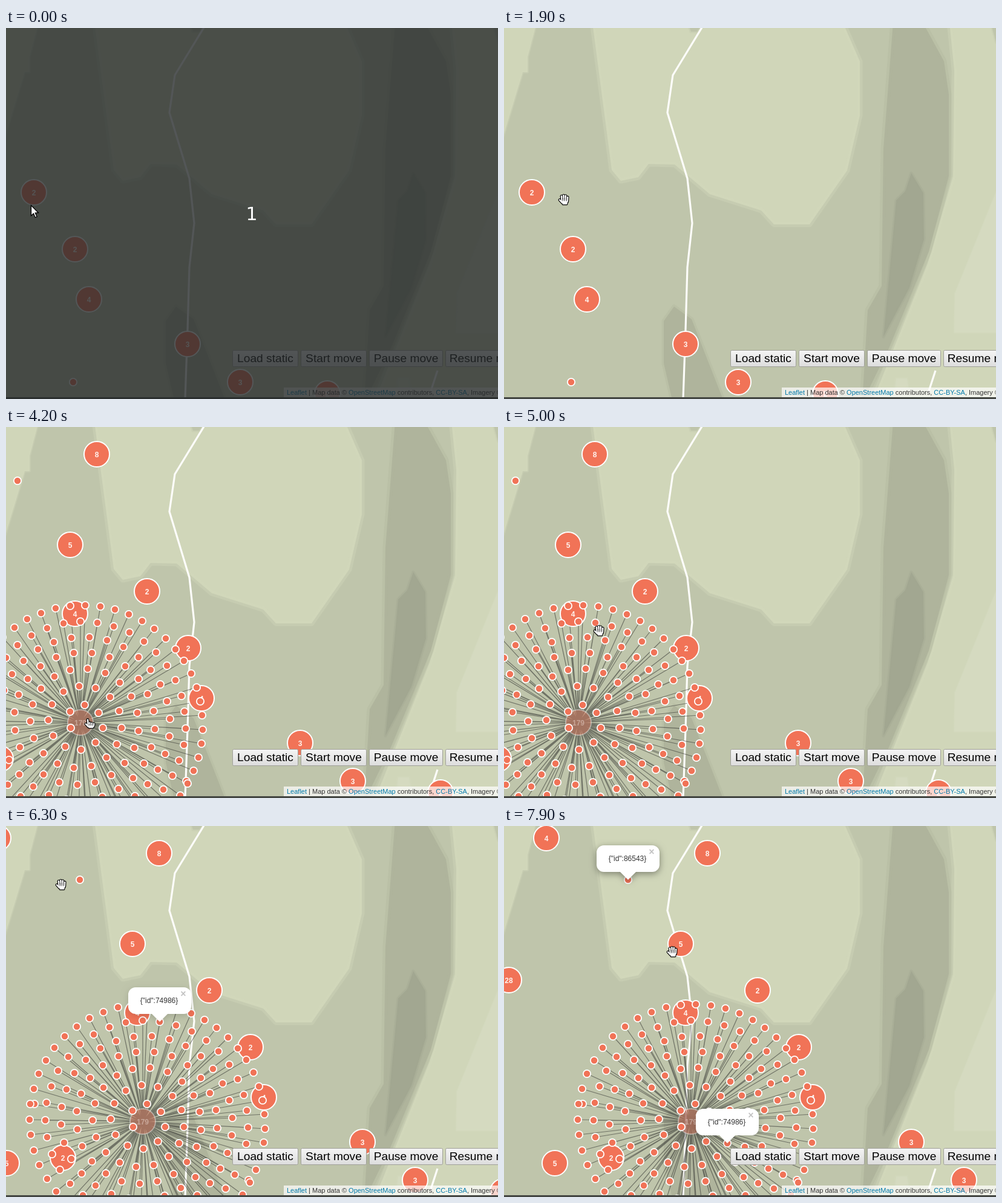
An HTML page with a canvas for the animation above (8000 ms loop, 813 by 614 pixels).

```html
<!DOCTYPE html>
<html lang="en">
<head>
<meta charset="utf-8">
<title>Clustered map</title>
<style>
html, body { margin: 0; width: 100%; height: 100%; overflow: hidden; background: #bfc5ab; }
canvas { display: block; width: 813px; height: 614px; }
</style>
</head>
<body>
<canvas id="stage" width="813" height="614"></canvas>
<script>
const W = 813, H = 614, LOOP = 8000, STEP = 100, SPIDER_AT = 4200;
const ctx = document.getElementById('stage').getContext('2d');
const SANS = '"Liberation Sans", Arial, sans-serif';
const RED = '#f17357', BASE = '#bfc5ab', LIGHT = '#d0d6b9', VALLEY = '#afb49c', PALE = '#d5dac0';

// [x, y, count] before any panning; no count means a single marker
const PINS = [
  [-303, 20, 4], [-37, 45, 8], [-168, 89], [-81, 195, 5], [-365, 255, 28],
  [46, 272, 2], [-73, 309, 4], [114, 366, 2], [136.6, 449, 4], [299.6, 523, 3],
  [-243, 460], [-196, 549, 2], [-289, 558, 5], [386.6, 586, 3], [111, 586], [531, 605, 2]
];
const HUB = [-64, 489];

// Straight cursor moves: [start, end, x, y]
const MOVES = [
  [200, 300, 58, 302], [300, 500, 52, 282], [600, 900, 76, 283], [1500, 1900, 99, 284],
  [2000, 2300, 64, 283], [2400, 2900, 116, 284], [2900, 3300, 117, 316], [3300, 3800, 132, 494],
  [4100, 4200, 139, 491], [4200, 4600, 171, 353], [4700, 5100, 152, 332], [5400, 5600, 160, 317],
  [5600, 6100, 56, 97], [6100, 6700, 160, 98], [6800, 7000, 206, 97], [7700, 7900, 278, 208]
];

// Spiral of markers, each step keeping a near-constant gap along the curve
function spiral(count) {
  const feet = [];
  let leg = 11, angle = 0;
  for (let i = count; i > 0; i--) {
    angle += 28 / leg + i * 0.0005;
    leg += Math.PI * 10 / angle;
    feet.push([Math.round(0.8 * leg * Math.cos(angle)), Math.round(0.8 * leg * Math.sin(angle))]);
  }
  return feet;
}
const FEET = spiral(179);

const clamp = v => Math.max(0, Math.min(1, v));
const glide = p => 1 - (1 - clamp(p)) ** 2.4;
const panAt = t => 186.6 * glide((t - 2400) / 900) + 186.4 * glide((t - 6100) / 700);

function trace(c, pts, close) {
  c.beginPath();
  pts.forEach(([x, y]) => c.lineTo(x, y));
  if (close) c.closePath();
}

function text(str, x, y, font, color, align = 'left') {
  ctx.font = font;
  ctx.fillStyle = color;
  ctx.textAlign = align;
  ctx.fillText(str, x, y);
}

// Filled terrain with a soft stepped rim
function area(c, color, pts, rim = 9) {
  trace(c, pts, true);
  c.fillStyle = c.strokeStyle = color;
  c.lineJoin = 'round';
  c.fill();
  c.globalAlpha = 0.35;
  c.lineWidth = rim;
  c.stroke();
  c.globalAlpha = 1;
}

function road(c, pts) {
  trace(c, pts);
  c.strokeStyle = '#fdfdfa';
  c.lineWidth = 3.2;
  c.lineJoin = 'round';
  c.stroke();
}

function makeMap() {
  const map = document.createElement('canvas');
  map.width = W;
  map.height = H;
  const c = map.getContext('2d');
  c.fillStyle = BASE;
  c.fillRect(0, 0, W, H);
  area(c, LIGHT, [[-9, -9], [54, -9], [39, 48], [39, 73], [31, 73], [-9, 205]], 4);
  area(c, LIGHT, [[146, -9], [178, 235], [193, 253], [222, 247], [239, 225], [282, 226], [340, 275],
    [425, 302], [446, 325], [505, 325], [567, 236], [588, 145], [588, 55], [560, -9]]);
  area(c, BASE, [[304, -9], [309, 6], [319, 6], [329, -9]], 5);
  area(c, LIGHT, [[736, -9], [744, 70], [742, 245], [700, 390], [608, 620], [830, 620], [830, -9]]);
  area(c, BASE, [[804, -9], [813, 24], [830, -9]], 4);
  area(c, PALE, [[820, 255], [745, 440], [744, 504], [820, 504]], 3);
  area(c, PALE, [[648, 580], [666, 580], [669, 598], [646, 598]], 5);
  area(c, VALLEY, [[643, -9], [692, -9], [727, 55], [735, 110], [735, 245], [702, 370],
    [636, 530], [592, 620], [601, 467], [624, 427], [627, 200]]);
  area(c, '#a2a791', [[673, 240], [693, 273], [694, 350], [670, 430], [627, 511], [648, 285], [663, 270]], 5);
  area(c, VALLEY, [[264, 485], [281, 461], [310, 482], [364, 620], [279, 620], [264, 555]], 7);
  road(c, [[329, -4], [279, 78], [270, 140], [303, 249], [311, 323], [303, 396], [300, 500], [296, 614]]);
  road(c, [[713, 567], [701, 604]]);
  return map;
}
const MAP = makeMap();

function disc(x, y, r, border) {
  ctx.beginPath();
  ctx.arc(x, y, r, 0, Math.PI * 2);
  ctx.fillStyle = RED;
  ctx.fill();
  ctx.lineWidth = border;
  ctx.strokeStyle = '#fff';
  ctx.stroke();
}

function pin(x, y, count) {
  if (!count) return disc(x, y, 6.1, 1.8);
  disc(x, y, 21, 2);
  text(count, x, y + 4.5, 'bold 12px ' + SANS, '#fff3ee', 'center');
}

function spider(x, y) {
  ctx.beginPath();
  for (const [dx, dy] of FEET) {
    ctx.moveTo(x, y);
    ctx.lineTo(x + dx, y + dy);
  }
  ctx.strokeStyle = 'rgba(34,34,34,.5)';
  ctx.lineWidth = 1.2;
  ctx.stroke();
}

function popup(x, y, id, alpha, shade) {
  if (alpha <= 0) return;
  ctx.save();
  ctx.globalAlpha = alpha;
  ctx.shadowColor = `rgba(0,0,0,${shade})`;
  ctx.shadowBlur = 12;
  ctx.shadowOffsetY = 3;
  ctx.fillStyle = '#fff';
  ctx.beginPath();
  ctx.roundRect(x - 52, y - 57, 104, 44, 12);
  ctx.moveTo(x - 14, y - 14);
  ctx.lineTo(x + 14, y - 14);
  ctx.lineTo(x, y);
  ctx.closePath();
  ctx.fill();
  ctx.shadowColor = 'transparent';
  text(`{"id":${id}}`, x - 1, y - 31, '12px ' + SANS, '#333', 'center');
  text('×', x + 39, y - 41, 'bold 16px ' + SANS, '#c3c3c3', 'center');
  ctx.restore();
}

function buttons() {
  const shade = ctx.createLinearGradient(0, 533, 0, 561);
  shade.addColorStop(0, '#f5f5f5');
  shade.addColorStop(1, '#dcdcdc');
  let x = 374;
  for (const [label, w] of [['Load static', 109], ['Start move', 109], ['Pause move', 122], ['Resume move', 137]]) {
    ctx.fillStyle = shade;
    ctx.strokeStyle = '#a0a09a';
    ctx.lineWidth = 1;
    ctx.beginPath();
    ctx.roundRect(x + 0.5, 533.5, w - 1, 27, 2);
    ctx.fill();
    ctx.stroke();
    text(label, x + w / 2, 553, '19.2px ' + SANS, '#000', 'center');
    x += w + 4;
  }
}

function credits() {
  ctx.fillStyle = 'rgba(255,255,255,.7)';
  ctx.fillRect(459, 595, W - 459, 16);
  let x = 464;
  const parts = ['Leaflet', ' | Map data © ', 'OpenStreetMap', ' contributors, ', 'CC-BY-SA', ', Imagery ©'];
  parts.forEach((part, i) => {
    text(part, x, 607, '11px ' + SANS, i % 2 ? '#333' : '#0078a8');
    x += ctx.measureText(part).width;
  });
  ctx.fillStyle = '#444743';
  ctx.fillRect(0, 611, W, 3);
}

// Four fingers and a thumb; pointing keeps only the first one raised
function hand(x, y, pointing) {
  const low = pointing ? 1 : 0;
  const fingers = [0, 1, 2, 3].map(k => {
    const tip = !pointing ? 0.9 * (k - 1.2) ** 2 - 7 : k ? 0.8 * k - 2.3 : -6.5;
    return [[-4 + 3.4 * k, tip], [-3 + 2.9 * k, 3 + low]];
  });
  fingers.push([[-7, 0.5], [-3, 5]]);
  const palm = [[-4, 1 + low], [7, 1 + low], [5, 8 - low], [-2, 8 - low]];

  ctx.save();
  ctx.translate(x, y);
  ctx.lineCap = ctx.lineJoin = 'round';
  for (const [color, width, rim] of [['#000', 4.8, 2.4], ['#fff', 2.5, 0.1]]) {
    ctx.strokeStyle = ctx.fillStyle = color;
    ctx.lineWidth = width;
    for (const finger of fingers) {
      trace(ctx, finger);
      ctx.stroke();
    }
    trace(ctx, palm, true);
    ctx.fill();
    ctx.lineWidth = rim;
    ctx.stroke();
  }
  ctx.fillStyle = '#000';
  for (let k = 0; k < 3; k++) ctx.fillRect(-2.2 + 3.1 * k, 3 * low - 3, 0.8, 5.5 - 2 * low);
  ctx.restore();
}

function arrow(x, y) {
  trace(ctx, [[0, 0], [0, 17], [4, 13.5], [6.8, 20], [9.6, 18.8], [6.8, 12.5], [12, 12.2]]
    .map(([dx, dy]) => [x + dx, y + dy]), true);
  ctx.fillStyle = '#fff';
  ctx.strokeStyle = '#000';
  ctx.lineWidth = 1.3;
  ctx.fill();
  ctx.stroke();
}

function cursorAt(t) {
  let [x, y] = [46, 303];
  for (const [start, end, toX, toY] of MOVES) {
    const p = clamp((t - start) / (end - start));
    x += (toX - x) * p;
    y += (toY - y) * p;
  }
  return [Math.round(x), Math.round(y)];
}

// Whether the fingertip rests on a marker
function hovering(t) {
  const [x, y] = cursorAt(t), pan = panAt(t);
  const near = (px, py, r) => Math.hypot(x - 4 - px, y - 8 - py) < r;
  return PINS.some(([px, py, count]) => near(px + pan, py, count ? 22 : 6)) ||
    near(HUB[0] + pan, HUB[1], 22) ||
    t >= SPIDER_AT && FEET.some(([dx, dy]) => near(HUB[0] + pan + dx, HUB[1] + dy, 6));
}

function curtain() {
  ctx.fillStyle = 'rgba(36,40,41,.78)';
  ctx.fillRect(0, 0, W, H);
  text('1', 406, 318, '30px "DejaVu Sans", sans-serif', '#fff', 'center');
  arrow(41.5, 293.5);
}

function draw(t) {
  const pan = panAt(t);
  const hubX = Math.round(HUB[0] + pan), hubY = HUB[1];
  const open = t >= SPIDER_AT;

  ctx.drawImage(MAP, 0, 0);
  if (open) spider(hubX, hubY);
  PINS.forEach(([x, y, count]) => pin(Math.round(x + pan), y, count));
  ctx.globalAlpha = open ? 0.4 : 1;
  pin(hubX, hubY, 179);
  ctx.globalAlpha = 1;
  if (open) FEET.forEach(([dx, dy]) => pin(hubX + dx, hubY + dy));

  // the first popup re-anchors once the second pan settles
  const [dx, dy] = t < 6700 ? [28, -165] : [60, 36];
  popup(hubX + dx, hubY + dy, 74986, clamp((t - 5200) / 250), 0.15);
  popup(205, 89, 86543, clamp((t - 7400) / 220), 0.4);

  buttons();
  credits();
  if (t < 300) curtain();
  else hand(...cursorAt(t), hovering(t - STEP)); // shape lags one step behind
}

function tick() {
  draw(Math.floor(performance.now() % LOOP / STEP) * STEP);
  requestAnimationFrame(tick);
}
tick();
</script>
</body>
</html>
```
